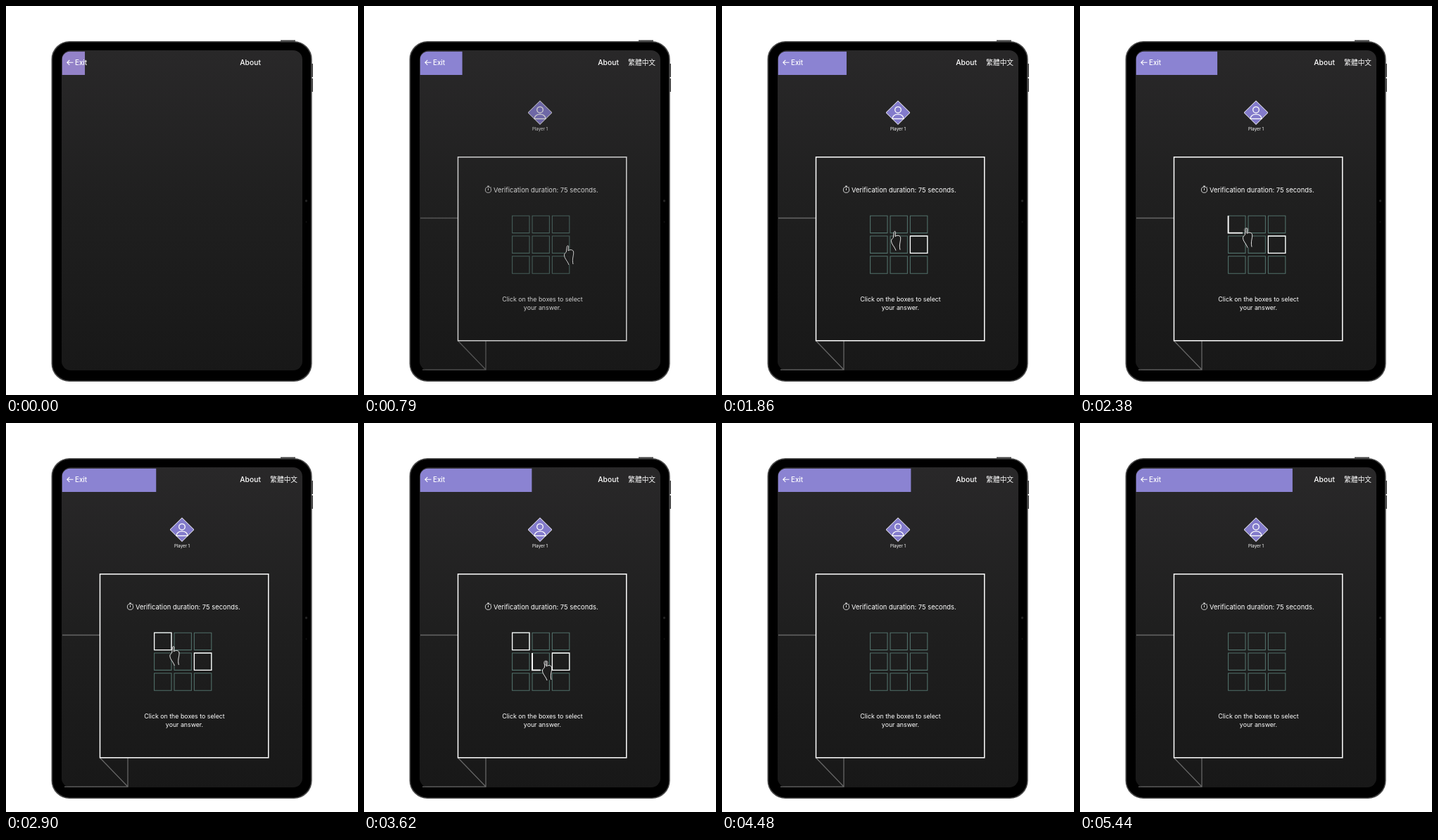
Recreate the animation shown at these times as an HTML page. Size 500 by 553 pixels, loop 5.5 s.

```html
<!DOCTYPE html>
<html lang="en">
<head>
<meta charset="utf-8">
<style>
  html, body { margin: 0; width: 100%; height: 100%; overflow: hidden; background: #fff; }
  svg { display: block; width: 500px; height: 553px; }
  text { font-family: Inter, "Noto Sans CJK TC", "Noto Sans CJK", sans-serif; fill: #fff; }
  .top { font-weight: 500; }
  .line { fill: none; stroke: #fff; }
</style>
</head>
<body>
<svg viewBox="0 0 500 553">
  <defs>
    <linearGradient id="shade" x2="0" y2="1">
      <stop stop-color="#292829"/><stop offset=".5" stop-color="#1f1f1f"/><stop offset="1" stop-color="#181818"/>
    </linearGradient>
    <clipPath id="screen"><rect x="79.5" y="64.5" width="341" height="453.5" rx="12"/></clipPath>
  </defs>

  <!-- tablet -->
  <path d="M390 49.5h21M435 82v19M435 103v19" stroke="#444" stroke-width="2"/>
  <rect x="65.3" y="50.8" width="368.6" height="482.4" rx="25" stroke="#4a4a4a" stroke-width="1.6"/>
  <rect x="79" y="63" width="342" height="455" rx="13" fill="url(#shade)"/>
  <circle cx="426.5" cy="277" r="1.7" fill="#232323"/>
  <circle cx="426.5" cy="307" r="1" fill="#141414"/>

  <!-- top bar -->
  <rect id="bar" x="79.5" y="64.5" height="33.5" clip-path="url(#screen)"/>
  <path class="line" d="M95.5 80.3H87M90.3 76.8L86.8 80.3L90.3 83.8" stroke-width="1.1"/>
  <text class="top" x="98" y="84" font-size="9.8">Exit</text>
  <text class="top" x="332.3" y="84" font-size="10.3">About</text>
  <text class="top" id="lang" x="375.3" y="84" font-size="9.7">繁體中文</text>

  <g id="page">
    <path class="line" d="M80 301.5H133M83 517.2H173V476M133.5 476L173 517" style="stroke:#666" stroke-width="1.3"/>
    <rect class="line" x="133.5" y="214.8" width="239.3" height="261" stroke-width="1.5"/>
    <path class="line" d="M250 134.8L267 151.6L250 168.4L233 151.6Z" style="fill:#837bcb" stroke-width="1"/>
    <circle class="line" cx="250" cy="147.6" r="4.3" stroke-width="1.3"/>
    <path class="line" d="M242 160.3C242 151.7 258 151.7 258 160.3Z" stroke-width="1.3"/>
    <text x="250" y="177.4" font-size="6.1" text-anchor="middle">Player 1</text>
    <g class="line" stroke-width=".8">
      <circle cx="176.5" cy="261.3" r="4.1"/>
      <path d="M175 256H178M176.5 256V257.2M176.5 259V262M180 257.3L180.8 258.1"/>
    </g>
    <text x="184" y="264.6" font-size="9.4">Verification duration: 75 seconds.</text>
    <g id="grid" class="line" style="stroke:#506f69" stroke-width="1.1"></g>
    <g id="marks" class="line"></g>
    <g font-size="8.8" text-anchor="middle">
      <text x="253.5" y="419.8">Click on the boxes to select</text>
      <text x="253.5" y="431.8">your answer.</text>
    </g>
  </g>
  <g id="hand" class="line" stroke-width=".9" stroke-linejoin="round">
    <path fill="#1d1d1d" d="M7 28C5 22 .5 19 .5 14C.5 11.5 2.5 11 3.2 10L4.3 2C4.6 .2 6.6 .3 6.5 2L6 8C8 6 12.5 6 13.5 9C14.5 14 11 19 13 27"/>
    <circle id="tap" cx="5.3" cy="3" r="3" stroke-width=".6"/>
  </g>
</svg>
<script>
const LOOP = 5500;
const $ = id => document.getElementById(id);
const ramp = (t, a, b) => Math.min(1, Math.max(0, (t - a) / (b - a)));
const ease = p => p * p * (3 - 2 * p);
const mix = (a, b, p) => a + (b - a) * p;

const cell = (col, row) => `M${210.6 + col * 28.4} ${298.2 + row * 28.8}v24.4h24.4v-24.4z`;
for (let i = 0; i < 9; i++)
  $('grid').innerHTML += `<path d="${cell(i % 3, i / 3 | 0)}"/>`;

// Selected cells: when each outline is drawn and when it fades
const picks = [
  { col: 2, row: 1, start: 1000, clear: 3920 },
  { col: 0, row: 0, start: 2170, clear: 4060 },
  { col: 1, row: 1, start: 3450, clear: 4140 },
];
for (const p of picks) {
  $('marks').innerHTML += `<path pathLength="1" d="${cell(p.col, p.row)}"/>`;
}
picks.forEach((p, i) => p.path = $('marks').children[i]);

function draw(t) {
  $('bar').setAttribute('width', 32.5 + t * 0.0349);
  const tint = ramp(t, 0, 500);
  $('bar').setAttribute('fill', `rgb(${mix(147, 139, tint)},${mix(130, 131, tint)},${mix(200, 210, tint)})`);
  $('lang').style.opacity = ramp(t, 30, 450);
  $('page').style.opacity = ramp(t, 150, 970);

  let tap = 0;
  for (const { path, start, clear } of picks) {
    const p = ramp(t, start, start + 460);
    path.style.strokeDasharray = p < 1 ? `${p} 2` : 'none';
    path.style.strokeWidth = p < 1 ? 1.9 : 1.3;
    path.style.opacity = p > 0 ? 1 - ramp(t, clear, clear + 240) : 0;
    tap = Math.max(tap, ramp(t, start - 60, start + 40) * (1 - ramp(t, start + 170, start + 330)));
  }

  const a = ease(ramp(t, 1610, 1950));
  const b = ease(ramp(t, 2830, 3300));
  const leave = ramp(t, 3900, 4300);
  const x = mix(mix(284, 231, a), 253, b);
  const y = mix(mix(340, 315.5, a), 338, b) + 7 * leave;
  $('hand').setAttribute('transform', `translate(${x} ${y})`);
  $('hand').style.opacity = ramp(t, 450, 850) * (1 - leave);
  $('tap').style.opacity = tap * .8;
}

const begin = performance.now();
function tick() {
  draw((performance.now() - begin) % LOOP);
  requestAnimationFrame(tick);
}
draw(0);
requestAnimationFrame(tick);
</script>
</body>
</html>
```
